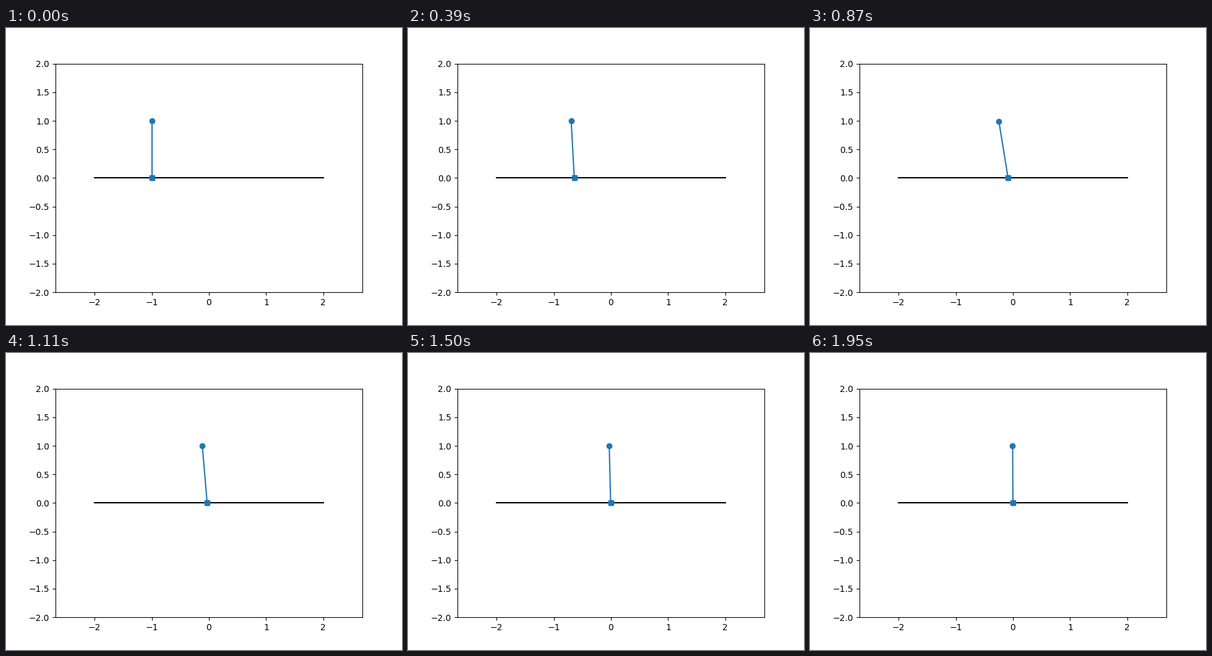
Write a matplotlib script that moves like this. It is 640 px wide and 480 px high and loops after 1980 ms.

```python
import numpy as np
import matplotlib.pyplot as plt
from matplotlib.animation import FuncAnimation

FRAMES, STEP_MS, SUBSTEPS = 66, 30, 15
GRAVITY, ARM = 9.81, 0.5         # ARM: effective pendulum length
POLES = (-4.8, -5.2, -5.3, -16)  # closed-loop decay rates, 1/s
BLUE = "tab:blue"


def feedback_gains():
    """Place the poles of x + ARM * lean, which obeys q'' = g * lean."""
    _, c3, c2, c1, c0 = np.poly(POLES)
    k = ARM / GRAVITY
    return np.array([k * c0,
                     k * c1,
                     GRAVITY + ARM * c2 + ARM * k * c0,
                     ARM * c3 + ARM * k * c1])


GAINS = feedback_gains()


def rates(state):
    x, speed, lean, spin = state
    push = GAINS @ state
    turn = (GRAVITY * np.sin(lean) - push * np.cos(lean)) / ARM
    return np.array([speed, push, spin, turn])


def advance(state, dt):
    """One Runge-Kutta step."""
    a = rates(state)
    b = rates(state + a * dt / 2)
    c = rates(state + b * dt / 2)
    d = rates(state + c * dt)
    return state + dt / 6 * (a + 2 * b + 2 * c + d)


def simulate():
    state = np.array([-1.0, 0, 0, 0])
    path = []
    for _ in range(FRAMES):
        path.append(state)
        for _ in range(SUBSTEPS):
            state = advance(state, STEP_MS / 1000 / SUBSTEPS)
    return path


path = simulate()

fig, ax = plt.subplots(figsize=(6.4, 4.8), dpi=100)
half_width = 2 * 496 / 369.6  # equal scale on both axes
ax.set_xlim(-half_width, half_width)
ax.set_ylim(-2, 2)
ax.set_xticks(range(-2, 3))
ax.set_yticks(np.arange(-2, 2.1, 0.5))

ax.plot([-2, 2], [0, 0], color="black")
pole, = ax.plot([], [], "o-", color=BLUE)
cart, = ax.plot([], [], "s", color=BLUE)


def update(frame):
    x, _, lean, _ = path[frame]
    pole.set_data([x, x + np.sin(lean)], [0, np.cos(lean)])
    cart.set_data([x], [0])
    return pole, cart


anim = FuncAnimation(fig, update, frames=FRAMES, interval=STEP_MS,
                     repeat=True, repeat_delay=0)
plt.show()
```
